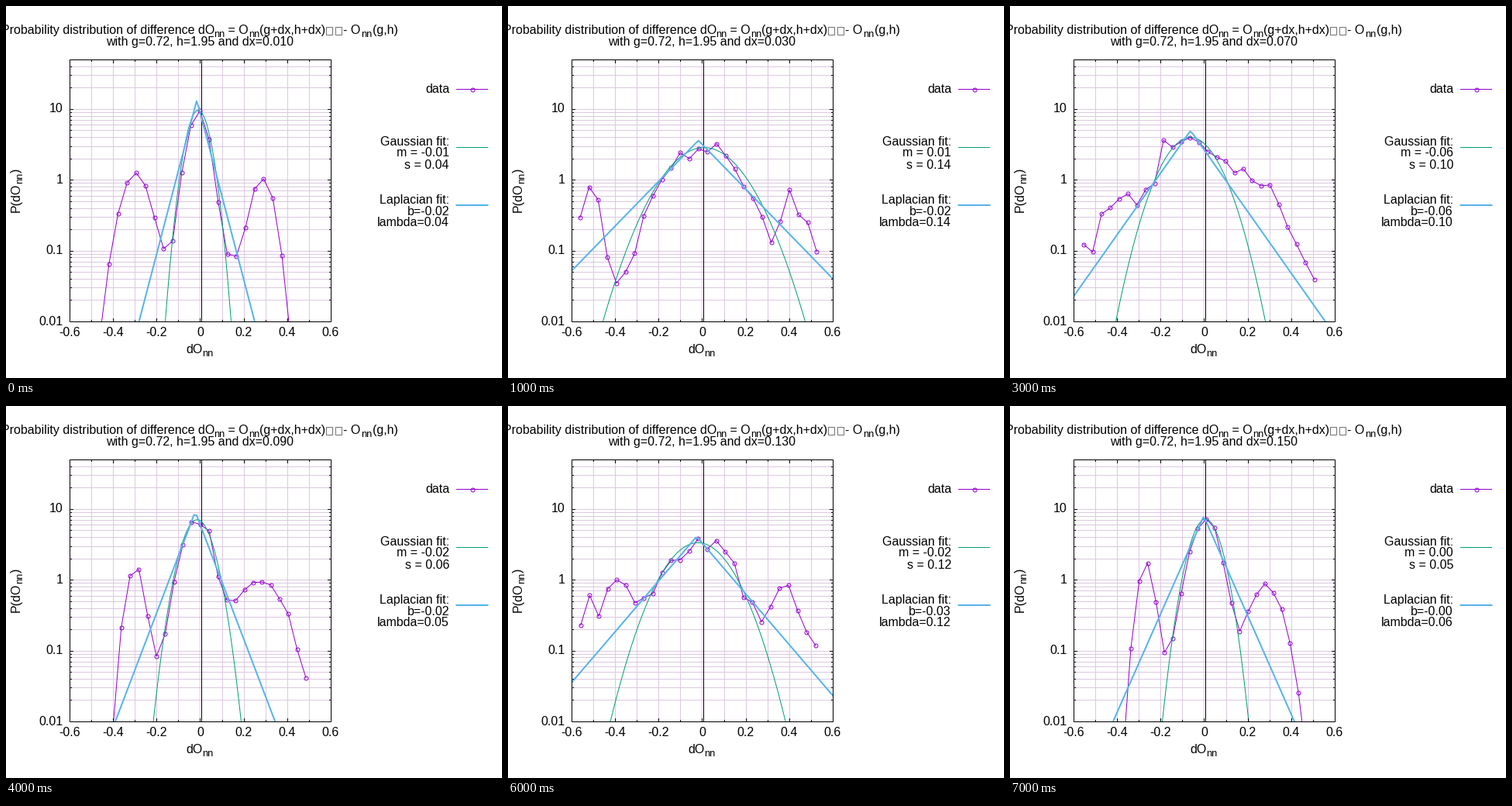
A matplotlib script for the animation above (8 s loop, 640 by 480 pixels).

```python
import numpy as np
import matplotlib.pyplot as plt
from matplotlib.animation import FuncAnimation
from matplotlib.patches import Rectangle

DPI = 80
PT = 72 / DPI  # points per pixel
LEFT, RIGHT, TOP, BOTTOM = 82, 419, 69, 407
PURPLE, TEAL, BLUE, GRID = "#9400d3", "#009e73", "#56b4e9", "#dcc8e0"
BINS = 27

plt.rcParams["font.family"] = "Liberation Sans"
fig = plt.figure(figsize=(8, 6), dpi=DPI, facecolor="white")
ax = fig.add_axes([0, 0, 1, 1])
ax.set_xlim(-0.5, 639.5)  # whole numbers are pixel centres
ax.set_ylim(479.5, -0.5)
ax.axis("off")


def px(x):
    return LEFT + (x + 0.6) * (RIGHT - LEFT) / 1.2


def py(p):
    return BOTTOM - (np.log10(p) + 2) * (BOTTOM - TOP) / np.log10(5000)


def line(xs, ys, color="black", width=1.0, z=3):
    return ax.plot(xs, ys, color=color, lw=width * PT, snap=False,
                   solid_capstyle="projecting", zorder=z)[0]


def circles(xs, ys, z=4):
    return ax.plot(xs, ys, "o", ms=5 * PT, mew=PT, mfc="none", mec=PURPLE,
                   snap=False, zorder=z)[0]


def text(x, y, s="", size=16, ha="left", rotation=0):
    return ax.text(x, y, s, fontsize=size * PT, ha=ha, va="baseline",
                   rotation=rotation, rotation_mode="anchor", zorder=9)


def sub(x, y, rotation=0):
    text(x, y, "nn", 12.8, rotation=rotation)


def bell(x, height, center, width):
    return height * np.exp(-((x - center) / width) ** 2 / 2)


def gauss(x, m, s):
    return bell(x, 1 / (s * np.sqrt(2 * np.pi)), m, s)


def laplace(x, b, lam):
    return np.exp(-np.abs(x - b) / lam) / (2 * lam)


def histogram(i):
    """Central peak, two side lobes and a shallow floor, with seeded noise."""
    (m, s), _, span, left, right = STEPS[i]
    x = np.linspace(*span, BINS)
    p = bell(x, 0.4 / s, m, 0.9 * s) + bell(x, *left) + bell(x, *right)
    p += 0.08 * np.exp(-(x / 0.25) ** 6)
    noise = np.random.default_rng(i).normal(0, 3 * s - 0.08, BINS)
    return px(x), py(np.maximum(p * np.exp(noise), 1e-5))


# Per step: Gaussian (m, s), Laplacian (b, lambda), span of the bins,
# left and right lobe (height, center, width)
STEPS = [
    ((-0.0107, 0.0408), (-0.0169, 0.0369), (-0.546, 0.541),
     (1.2, -0.30, 0.05), (1.05, 0.285, 0.04)),
    ((0.007, 0.1382), (-0.019, 0.1374), (-0.563, 0.525),
     (0.63, -0.51, 0.04), (0.8, 0.44, 0.042)),
    ((0.016, 0.092), (0.012, 0.094), (-0.56, 0.52),
     (0.7, -0.40, 0.07), (0.9, 0.35, 0.06)),
    ((-0.064, 0.0993), (-0.064, 0.0997), (-0.555, 0.504),
     (0.65, -0.35, 0.1), (1.0, 0.18, 0.12)),
    ((-0.0151, 0.0557), (-0.0245, 0.0538), (-0.566, 0.484),
     (1.6, -0.30, 0.032), (1.0, 0.27, 0.085)),
    ((-0.0018, 0.069), (0.0053, 0.0707), (-0.559, 0.53),
     (1.0, -0.29, 0.093), (0.95, 0.27, 0.08)),
    ((-0.021, 0.118), (-0.027, 0.121), (-0.56, 0.52),
     (0.8, -0.42, 0.08), (0.8, 0.38, 0.07)),
    ((0.0045, 0.0547), (-0.0036, 0.0624), (-0.531, 0.47),
     (1.6, -0.27, 0.03), (0.9, 0.28, 0.057)),
]

# Grid and ticks
for i in range(1, 12):
    x = round(px(-0.6 + i / 10))
    size = 2 if i % 2 else 4
    line([x, x], [TOP, BOTTOM], GRID, z=1)
    line([x, x], [BOTTOM, BOTTOM - size], z=7)
    line([x, x], [TOP, TOP + size], z=7)
for e in range(-2, 2):
    for k in range(1, 10):
        p = k * 10.0 ** e
        if not 0.01 < p < 50:
            continue
        y = round(py(p))
        size = 4 if k == 1 else 2
        line([LEFT, RIGHT], [y, y], GRID, z=1)
        line([LEFT, LEFT + size], [y, y], z=7)
        line([RIGHT, RIGHT - size], [y, y], z=7)
line([252, 252], [TOP, BOTTOM], z=2)
line([LEFT, RIGHT, RIGHT, LEFT, LEFT], [BOTTOM, BOTTOM, TOP, TOP, BOTTOM], z=7)

for v in ("-0.6", "-0.4", "-0.2", "0", "0.2", "0.4", "0.6"):
    text(px(float(v)) - 0.5, 426, v, ha="center")
for v in ("0.01", "0.1", "1", "10"):
    text(73, py(float(v)) + 4, v, ha="right")

# Title and axis names
text(-7, 35.5, "Probability distribution of difference dO")
sub(267.5, 39.5)
text(282, 35.5, " = O")
sub(312.5, 39.5)
text(326.5, 35.5, "(g+dx,h+dx)")
for x in (412.5, 424.5):
    ax.add_patch(Rectangle((x, 26), 8, 10, fill=False, ec="#505050", lw=0.8 * PT))
text(434.5, 35.5, "- O")
sub(457.5, 39.5)
text(472, 35.5, "(g,h)")
subtitle = text(249.5, 51, ha="center")
text(232, 448, "dO")
sub(253, 451.5)
text(17, 266, "P(dO", rotation=90)
sub(21, 228.5, rotation=90)
text(17, 214.5, ")", rotation=90)

# Key
text(571.5, 111, "data", ha="right")
text(571.5, 179, "Gaussian fit:", ha="right")
text(571.5, 254, "Laplacian fit:", ha="right")
labels = [text(571.5, y, ha="right") for y in (194, 209, 269, 284)]
line([581, 621], [107, 107], PURPLE)
circles([601], [107])
line([581, 621], [182, 182], TEAL)
line([581, 621], [256.5, 256.5], BLUE, 2)

# Curves, clipped to the plot box
box = Rectangle((LEFT, TOP), RIGHT - LEFT, BOTTOM - TOP, transform=ax.transData)
data_line = line([], [], PURPLE)
marks = circles([], [])
gauss_line = line([], [], TEAL, z=5)
laplace_line = line([], [], BLUE, 2, z=6)
for curve in (data_line, gauss_line, laplace_line):
    curve.set_clip_path(box)
grid_x = np.linspace(-0.6, 0.6, 100)


def update(i):
    (m, s), (b, lam) = STEPS[i][:2]
    subtitle.set_text(f"with g=0.72, h=1.95 and dx={0.01 + 0.02 * i:.3f}")
    words = (f"m = {m:.2f}", f"s = {s:.2f}", f"b={b:.2f}", f"lambda={lam:.2f}")
    for label, word in zip(labels, words):
        label.set_text(word)
    gauss_line.set_data(px(grid_x), py(gauss(grid_x, m, s)))
    laplace_line.set_data(px(grid_x), py(laplace(grid_x, b, lam)))
    xs, ys = histogram(i)
    data_line.set_data(xs, ys)
    seen = ys <= BOTTOM
    marks.set_data(xs[seen], ys[seen])
    return []


anim = FuncAnimation(fig, update, frames=len(STEPS), interval=1000,
                     repeat=True, repeat_delay=0, blit=False)
plt.show()
```
